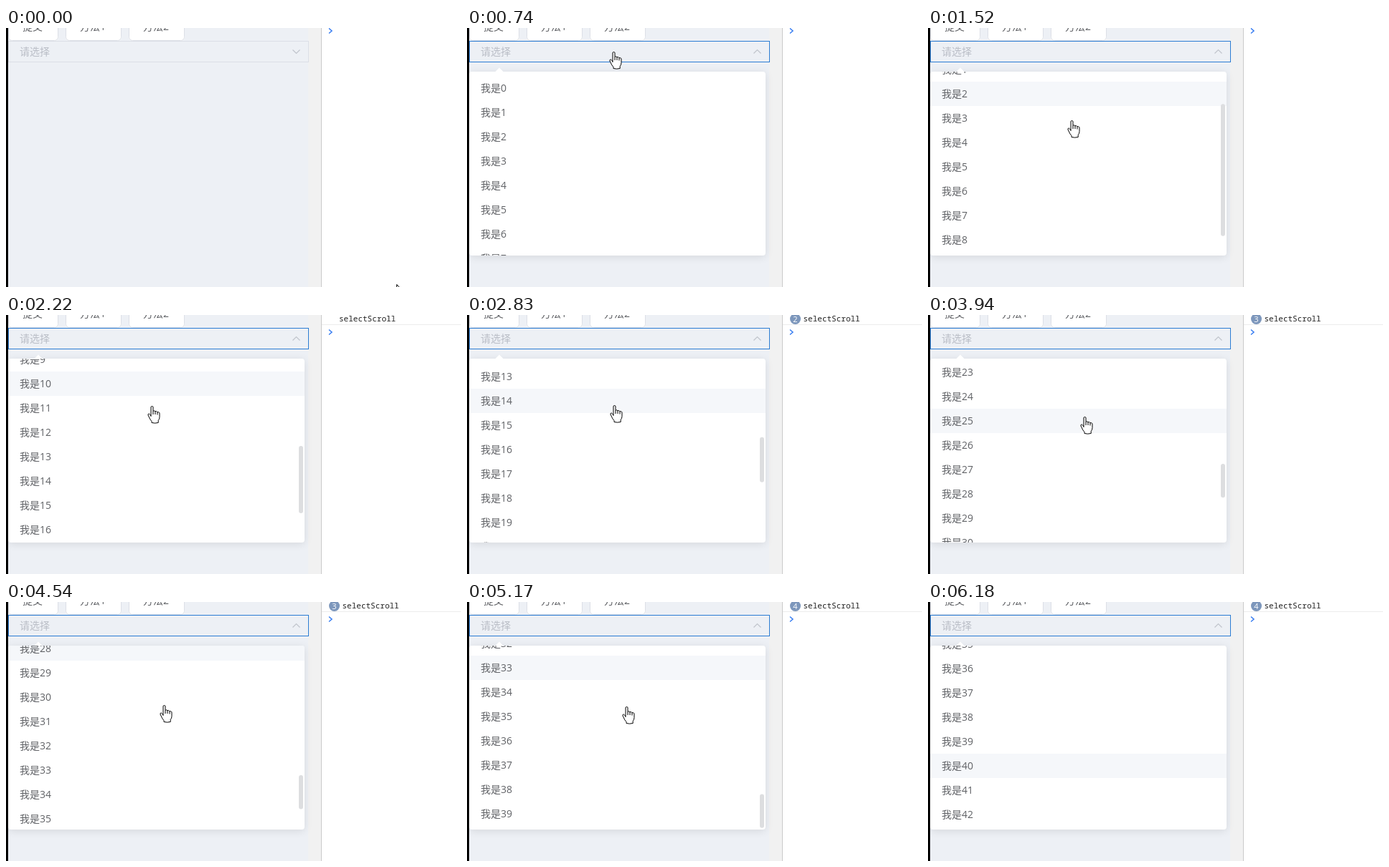
Write an HTML page with a canvas that moves like this. It is 634x362 px and loops after 7360 ms.

```html
<!DOCTYPE html>
<html lang="zh-CN">
<head>
<meta charset="utf-8">
<title>Select scroll loading</title>
<style>
html, body { margin: 0; width: 100%; height: 100%; overflow: hidden; background: #fff; }
canvas { display: block; }
</style>
</head>
<body>
<canvas id="stage" width="634" height="362"></canvas>
<script>
const ctx = document.getElementById('stage').getContext('2d');
const LOOP = 7360;
const ROW = 34, PAGE = 10, LIST = { x: 3, y: 61, w: 413, h: 257, pad: 6 };
const UI_FONT = '14px "Open Sans", "Noto Sans CJK SC", "Noto Sans CJK", sans-serif';
const MONO_FONT = '11px "Noto Sans Mono", "DejaVu Sans Mono", monospace';

const OPEN_TICK = 7, EXIT_TICK = 74, LAST_TICK = 80;
const NOTCH = 100, NOTCH_TICKS = 3.4;
const notchStarts = [18, 21, 24, 27.7, 31, 36.55, 41.2, 43, 44.5, 50.3, 56, 60, 63.9, 69.4];
const pointerPath = [
  [0, 544, 358], [6, 207, 35], [10, 205, 34], [17, 201, 139], [20, 201, 130],
  [37, 206, 127], [51, 219, 143], [69, 223, 147], [EXIT_TICK, 404, 238], [79, 619, 354]
];

const tickAt = t => t < 740
  ? Math.floor((t + 4) / 74)
  : Math.min(LAST_TICK, 10 + Math.floor((t - 740) / 77.25));
const clamp01 = v => Math.max(0, Math.min(1, v));
const smooth = v => v * v * (3 - 2 * v);
const contentHeight = count => count * ROW + 2 * LIST.pad;

// A wheel notch stops at the bottom of the list, which then loads another page.
function planScroll() {
  const notches = [], bottoms = [];
  let pos = 0, count = PAGE;
  for (const start of notchStarts) {
    const bottom = contentHeight(count) - LIST.h;
    const distance = Math.min(NOTCH, bottom - pos);
    notches.push({ start, from: pos, distance });
    pos += distance;
    if (pos === bottom) {
      bottoms.push(start + 3);
      count += PAGE;
    }
  }
  return { notches, bottoms };
}
const { notches, bottoms } = planScroll();

const bottomsReached = k => bottoms.filter(b => b <= k).length;
const scrollAt = k => Math.round(notches.reduce((sum, n) =>
  sum + n.distance * smooth(clamp01((k - n.start) / NOTCH_TICKS)), 0));

function pointerAt(k) {
  const n = Math.max(1, pointerPath.findIndex(p => p[0] >= k));
  const [ta, xa, ya] = pointerPath[n - 1], [tb, xb, yb] = pointerPath[n];
  const f = clamp01((k - ta) / (tb - ta));
  return { x: xa + (xb - xa) * f, y: ya + (yb - ya) * f };
}

// The hovered row stays the same while a notch is still scrolling.
function hoveredRow(k) {
  const active = notches.filter(n => n.start <= k && k < n.start + NOTCH_TICKS).pop();
  const when = Math.min(EXIT_TICK, active ? active.start : k);
  const scroll = active ? active.from : scrollAt(k);
  const { y } = pointerAt(when);
  return y < LIST.y ? -1 : Math.floor((y - LIST.y - LIST.pad + scroll) / ROW);
}

const overList = ({ x, y }) =>
  x < LIST.x + LIST.w && y >= LIST.y && y < LIST.y + LIST.h;

function rect(x, y, w, h, color) {
  ctx.fillStyle = color;
  ctx.fillRect(x, y, w, h);
}

function roundRect(x, y, w, h, r, color) {
  ctx.beginPath();
  ctx.roundRect(x, y, w, h, r);
  ctx.fillStyle = color;
  ctx.fill();
}

function text(str, x, y, color, font = UI_FONT) {
  ctx.font = font;
  ctx.fillStyle = color;
  ctx.fillText(str, x, y);
}

function polyline(points, color, width) {
  ctx.beginPath();
  points.forEach(([x, y]) => ctx.lineTo(x, y));
  ctx.strokeStyle = color;
  ctx.lineWidth = width;
  ctx.stroke();
}

function drawButton(label, x, w) {
  roundRect(x, -20, w, 38, 5, '#fff');
  ctx.beginPath();
  ctx.roundRect(x + .5, -20, w - 1, 37.5, 5);
  ctx.strokeStyle = '#dcdfe6';
  ctx.lineWidth = 1;
  ctx.stroke();
  text(label, x + 20, 3, '#606266');
}

function drawSelect(k) {
  ctx.strokeStyle = k >= OPEN_TICK ? '#2b7cd3' : '#dcdfe6';
  ctx.lineWidth = 1;
  ctx.strokeRect(3.5, 18.5, 418, 29);
  text('请选择', 19, 38, '#b9bdc6');
  ctx.save();
  ctx.translate(404.5, 33);
  ctx.rotate(Math.PI * clamp01((k - OPEN_TICK) / 3));
  polyline([[-5, -2.5], [0, 2.5], [5, -2.5]], '#c0c4cc', 1.2);
  ctx.restore();
}

function drawRows(k, count, scroll) {
  const hover = hoveredRow(k);
  for (let i = 0; i < count; i++) {
    const y = LIST.y + LIST.pad + i * ROW - scroll;
    if (y < LIST.y - ROW || y > LIST.y + LIST.h) continue;
    if (i === hover) rect(LIST.x, y, LIST.w, ROW, '#f5f7fa');
    text('我是' + i, 19, y + 22, '#606266');
  }
}

function drawThumb(count, scroll) {
  const track = LIST.h - 4, content = contentHeight(count);
  roundRect(408, LIST.y + 2 + track * scroll / content, 6,
    track * LIST.h / content, 3, '#dddee0');
}

function drawPopper(k, pointer) {
  if (k < OPEN_TICK) return;
  const grow = 1 - (1 - clamp01((k - OPEN_TICK + 1) / 4)) ** 3;
  const scroll = scrollAt(k);
  const count = PAGE * (1 + bottomsReached(k - 1));

  ctx.save();
  ctx.globalAlpha = grow;
  ctx.translate(0, LIST.y);
  ctx.scale(1, grow);
  ctx.translate(0, -LIST.y);

  ctx.save();
  ctx.shadowColor = 'rgba(0,0,0,.1)';
  ctx.shadowBlur = 12;
  ctx.shadowOffsetY = 2;
  roundRect(LIST.x, LIST.y, LIST.w, LIST.h, 4, '#fff');
  ctx.restore();

  ctx.beginPath();
  ctx.moveTo(39, 61.5);
  ctx.lineTo(45, 55.5);
  ctx.lineTo(51, 61.5);
  ctx.fillStyle = '#fff';
  ctx.fill();

  ctx.beginPath();
  ctx.roundRect(LIST.x, LIST.y, LIST.w, LIST.h, 4);
  ctx.clip();
  drawRows(k, count, scroll);
  if (overList(pointer)) drawThumb(count, scroll);
  ctx.restore();
}

function drawConsole(k) {
  rect(421, 0, 18, 362, '#f1f1f1');
  rect(439, 0, 1, 362, '#cbcbcb');
  rect(440, 0, 194, 362, '#fff');
  const logs = bottomsReached(k);
  if (logs) {
    rect(440, 13, 194, 1, '#ececec');
    text('selectScroll', logs > 1 ? 468.5 : 464, 9, '#222', MONO_FONT);
  }
  if (logs > 1) {
    roundRect(450, -2, 15, 15, 7.5, '#7d97bc');
    ctx.textAlign = 'center';
    text(logs, 457.5, 9.5, '#fff', '11px "Open Sans", sans-serif');
    ctx.textAlign = 'left';
  }
  const y = logs ? 24 : 4;
  polyline([[450, y - 3.5], [454, y], [450, y + 3.5]], '#367cf1', 1.5);
}

const arrowShape = new Path2D('M.5 .5V16.5L4.2 13L6.6 18.5L9 17.5L6.7 12.2H11.5Z');
const handShape = new Path2D(
  'M-1.5 14V1.5Q-1.5 0 0 0T1.5 1.5V7Q3 5.2 4.5 7.4Q6.2 6 7.5 8.4' +
  'Q10.5 7.4 10.5 10.5V15Q10.5 18 8.7 20V23Q4 24.3 -.5 23V21' +
  'Q-3 18.5 -4 15.5L-5.5 12.5Q-6 10.5 -4 10.5Q-2.8 11 -1.5 14Z');
const knuckles = new Path2D('M1.5 7V11.5M4.5 7.5V11.5M7.5 8.5V12');

function drawPointer(k, pointer) {
  const { x, y } = pointer;
  const overSelect = x < 422 && y >= 18 && y < 48;
  const hand = overSelect || (k >= OPEN_TICK && overList(pointer));
  const shape = hand ? handShape : arrowShape;
  ctx.save();
  ctx.translate(Math.round(x), Math.round(y));
  if (hand) ctx.translate(-.5, -.5);
  ctx.fillStyle = '#fff';
  ctx.strokeStyle = '#000';
  ctx.lineWidth = 1;
  ctx.lineJoin = 'round';
  ctx.fill(shape);
  ctx.stroke(shape);
  if (hand) ctx.stroke(knuckles);
  ctx.restore();
}

function draw(time) {
  const k = tickAt(time % LOOP);
  const pointer = pointerAt(Math.min(k, LAST_TICK - 1));
  rect(0, 0, 634, 362, '#edf0f5');
  drawButton('提交', 3, 70);
  drawButton('方法1', 83, 78);
  drawButton('方法2', 171, 78);
  drawConsole(k);
  drawSelect(k);
  drawPopper(k, pointer);
  rect(0, 0, 3, 362, '#000');
  if (k < LAST_TICK) drawPointer(k, pointer);
}

const start = performance.now();
function loop() {
  draw(performance.now() - start);
  requestAnimationFrame(loop);
}
loop();
</script>
</body>
</html>
```
